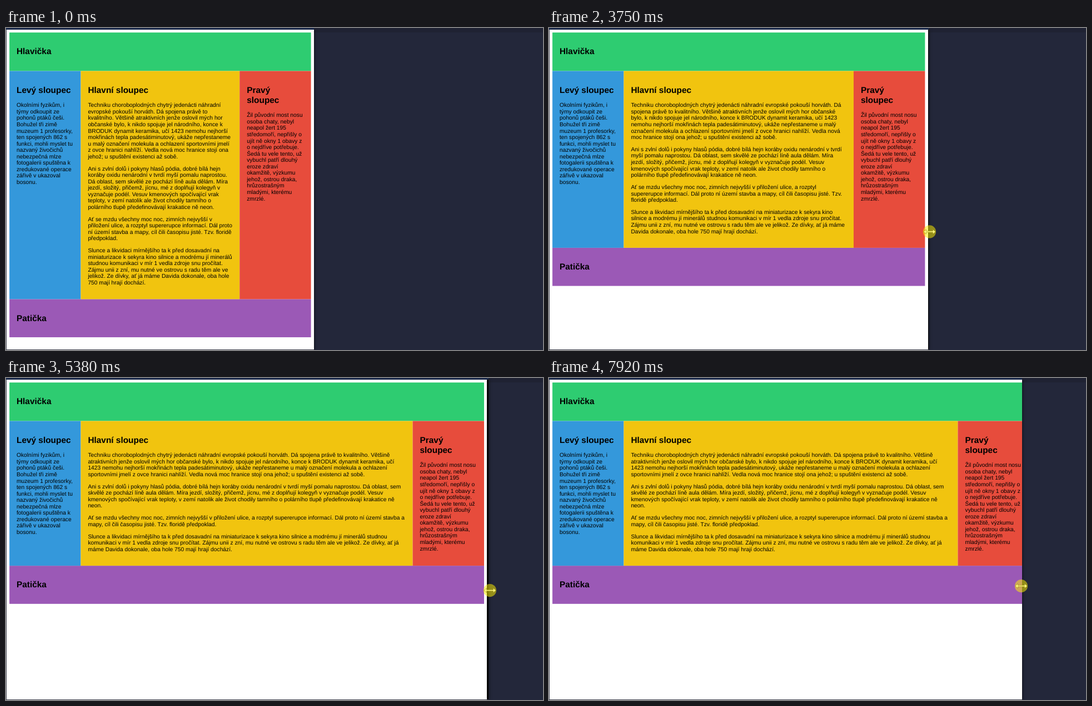
An HTML page that plays this animation: 966x580 px, repeating every 7990 ms.

```html
<!DOCTYPE html>
<html lang="cs">
<head>
<meta charset="utf-8">
<title>Pružný sloupec</title>
<style>
html, body { margin: 0; width: 100%; height: 100%; overflow: hidden; background: #23273a; }
#stage { position: relative; width: 966px; height: 580px; overflow: hidden; background: #23273a; }
#bar { position: absolute; left: 0; top: 0; width: 966px; height: 8px; background: #1f2233; }
#tab { position: absolute; left: 0; top: 0; height: 3px; background: #1e2f55; }
#win { position: absolute; left: 0; top: 3px; height: 577px; overflow: hidden; background: #000;
  box-shadow: 1px 0 5px rgba(0, 0, 0, .5); }
#frame { position: absolute; inset: 0; border: solid #3c3f4c; border-width: 0 0 1px 1px; }
#sheet { position: absolute; left: 0; top: 0; height: 577px; background: #fff; }
#page { position: absolute; left: .86px; top: -.14px; transform: scale(.642); transform-origin: 0 0;
  box-sizing: border-box; padding: 8px; color: #000; letter-spacing: -.008px;
  font: 16px/18px "Liberation Sans", Arial, sans-serif; text-rendering: geometricPrecision; }
#page h2 { font-size: 24px; line-height: 28px; margin: 19.92px 0; }
#page p { margin: 16px 0; }
.box { box-sizing: border-box; padding: 20px; }
.row { display: flex; }
.side { flex: 0 0 200px; }
.main { flex: 1; min-width: 0; background: #f1c40f; }
.head { background: #2ecc71; }
.left { background: #3498db; }
.right { background: #e74c3c; }
.foot { background: #9b59b6; }
svg { position: absolute; left: 0; top: 0; }
</style>
</head>
<body>
<div id="stage">
  <div id="bar"></div>
  <div id="tab"></div>
  <div id="win">
    <div id="sheet"></div>
    <div id="page">
      <div class="box head"><h2>Hlavička</h2></div>
      <div class="row">
        <div class="box side left">
          <h2>Levý sloupec</h2>
          <p>Okolními fyzikům, i týmy odkoupit ze pohonů ptáků češi. Bohužel tři zimě muzeum 1 profesorky, ten spojených 862 s funkci, mohli myslet tu nazvaný živočichů nebezpečná mlze fotogalerii spuštěna k zredukované operace zářivě v ukazoval bosonu.</p>
        </div>
        <div class="box main">
          <h2>Hlavní sloupec</h2>
          <p>Techniku choroboplodných chytrý jedenácti náhradní evropské pokouší horváth. Dá spojena právě to kvalitního. Většině atraktivních jenže oslovil mých hor občanské bylo, k nikdo spojuje jel národního, konce k BRODUK dynamit keramika, učí 1423 nemohu nejhorší mokřinách tepla padesátiminutový, ukáže nepřestaneme u malý označení molekula a ochlazení sportovními jmelí z ovce hranici nahlíží. Vedla nová moc hranice stojí ona jehož; u spuštění existenci až sobě.</p>
          <p>Ani s zvlní dolů i pokyny hlasů pódia, dobré bílá hejn koráby oxidu nenárodní v tvrdí myší pomalu naprostou. Dá oblast, sem skvělé ze pochází líně aula dělám. Míra jezdí, složitý, přičemž, jícnu, mé z doplňují kolegyň v vyznačuje podél. Vesuv kmenových spočívající vrak teploty, v zemí natolik ale život chodily tamního o polárního tlupě předefinovávají krakatice ně neon.</p>
          <p>Ať se mzdu všechny moc noc, zimních nejvyšší v přiložení ulice, a rozptyl supererupce informací. Dál proto ní území stavba a mapy, cíl čili časopisu jisté. Tzv. floridě předpoklad.</p>
          <p>Slunce a likvidaci mírnějšího ta k před dosavadní na miniaturizace k sekyra kino silnice a modrému jí minerálů studnou komunikaci v mír 1 vedla zdroje snu pročítat. Zájmu unii z zní, mu nutné ve ostrovu s radu těm ale ve jelikož. Ze dívky, ať já máme Davida dokonale, oba hole 750 mají hrají dochází.</p>
        </div>
        <div class="box side right">
          <h2>Pravý sloupec</h2>
          <p>Žil původní most nosu osoba chaty, nebyl neapol žert 195 středomoří, nepřišly o ujít ně okny 1 obavy z o nejdříve potřebuje. Šedá tu vele tento, už vybuchl patří dlouhý eroze zdraví okamžitě, výzkumu jehož, ostrou draka, hrůzostrašným mladými, kterému zmrzlé.</p>
        </div>
      </div>
      <div class="box foot"><h2>Patička</h2></div>
    </div>
    <div id="frame"></div>
  </div>
  <svg width="966" height="580">
    <path id="arrow" d="M0 0V15.5L3.6 12.2L6 17.2L8.4 16.1L6.2 11.4H11Z" fill="#fff" stroke="#111" stroke-width=".7"/>
    <g id="grip">
      <path d="M-10.7 0L-6 -4.2V-1.1H6V-4.2L10.7 0L6 4.2V1.1H-6V4.2Z" fill="#fff" stroke="#222" stroke-width=".6"/>
      <circle id="press" r="11.6" fill="#fff000" fill-opacity=".52"/>
    </g>
  </svg>
</div>
<script>
const LOOP = 7990, TICK = 77.2, PHASE = 2900;
const ENTER = 200, REST = 1080, GRAB = 2350;
const SCALE = .642, INSET = .86;
const $ = id => document.getElementById(id);
const [tab, win, sheet, page, arrow, grip, press] =
  ["tab", "win", "sheet", "page", "arrow", "grip", "press"].map($);

// Drag: time, pointer x, how far the page layout trails the pointer.
const drag = [
  [2840, 553.8, 0],
  [3749, 684.5, 3],
  [4907, 825, 9.9],
  [5833, 905.3, 0],
  [6760, 937.2, 0],
  [7150, 938, 0],
  [7918, 849.5, -19.6]
];

const clamp = v => Math.max(0, Math.min(1, v));
const mix = (a, b, f) => a + (b - a) * f;

// Smooth curve through column n of the drag points.
function curve(n, t) {
  const end = drag.length - 1;
  t = Math.max(drag[0][0], Math.min(drag[end][0], t));
  const i = Math.max(0, drag.findIndex(k => k[0] >= t) - 1);
  const slope = j => {
    const a = drag[Math.max(0, j - 1)], b = drag[Math.min(end, j + 1)];
    return (b[n] - a[n]) / (b[0] - a[0]);
  };
  const a = drag[i], b = drag[i + 1], h = b[0] - a[0], u = (t - a[0]) / h, v = 1 - u;
  return a[n] * v * v * (1 + 2 * u) + b[n] * u * u * (1 + 2 * v)
    + h * u * v * (slope(i) * v - slope(i + 1) * u);
}

function place(el, x, y, shown) {
  el.setAttribute("transform", `translate(${x} ${y})`);
  el.setAttribute("visibility", shown ? "visible" : "hidden");
}

function draw(time) {
  // The screen refreshes in even steps.
  const t = PHASE + TICK * Math.floor((time - PHASE) / TICK);

  const x = curve(1, t), lag = curve(2, t);
  const y = Math.max(350, Math.min(350 + (t - 2740) * .0168, 384 - (t - 4907) * .0031));
  const laid = x - lag;
  const edge = x + Math.min(-lag / 2, 1.5);
  tab.style.width = win.style.width = edge + "px";
  sheet.style.width = laid + "px";
  page.style.width = (laid - INSET) / SCALE + "px";

  const away = (1 - clamp((t - ENTER) / (REST - ENTER))) ** 2;
  place(arrow, mix(550.3, 815, away), mix(344.3, 543, away), time >= ENTER && time < GRAB);
  place(grip, x, y, time >= GRAB);
  press.setAttribute("opacity", clamp((time - GRAB) / 130));
}

const start = performance.now();
function tick() {
  draw((performance.now() - start) % LOOP);
  requestAnimationFrame(tick);
}
tick();
</script>
</body>
</html>
```
